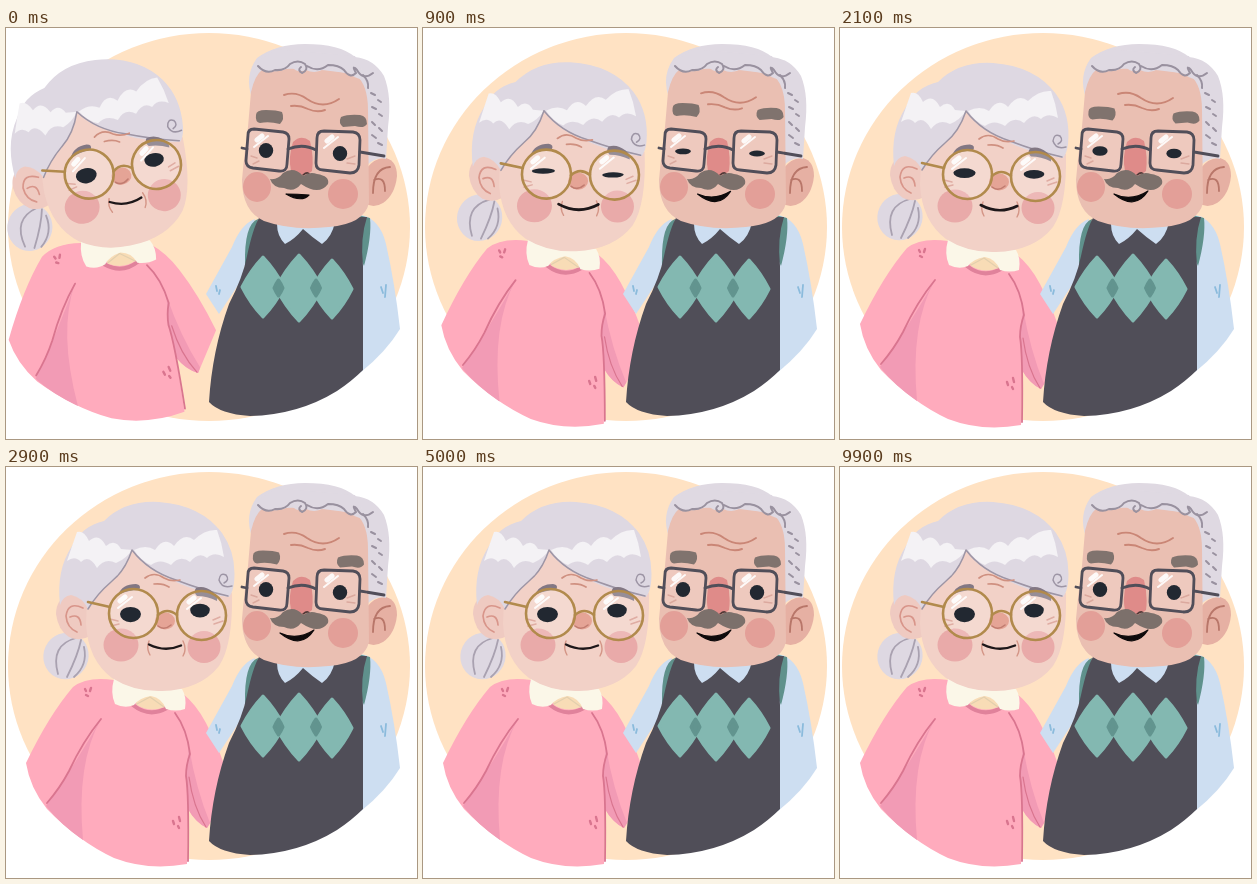
These frames come from a looping animation (411 by 411 pixels, 10 s). An HTML page:

```html
<!DOCTYPE html>
<html lang="en">
<head>
<meta charset="utf-8">
<title>Grandparents</title>
<style>
  html, body { margin: 0; width: 100%; height: 100%; overflow: hidden; background: #fff; }
  svg { display: block; width: 100vw; height: 100vh; }
  .line { fill: none; stroke-linecap: round; stroke-linejoin: round; }
</style>
</head>
<body>
<svg viewBox="0 0 411 411" xmlns="http://www.w3.org/2000/svg">
  <ellipse cx="203" cy="199" rx="201" ry="194" fill="#ffe2c3"/>

  <g id="woman">
    <!-- bun -->
    <ellipse cx="60" cy="189" rx="22.5" ry="23.5" fill="#ded8e2" transform="rotate(25 60 189)"/>
    <g class="line" stroke="#a9a1b0" stroke-width="1.8">
      <path d="M70 171Q44 178 52 207M75 173Q72 188 61 210M78 180Q82 198 68 210"/>
    </g>
    <!-- body -->
    <path fill="#ffabbd" d="M108 213Q81 209 67 220Q43 248 20 296Q24 321 41 342Q72 374 108 391Q142 404 181 397L182 342Q190 356 201 361L226 322Q215 284 200 256Q190 237 176 226Z"/>
    <path fill="#f29bb5" d="M95 252Q70 296 77 373Q54 357 40 339Q70 296 95 252Z"/>
    <path fill="#f29bb5" d="M183 280Q190 322 204 356L201 361Q189 355 182 342L180 306Z"/>
    <g class="line" stroke="#d9758f" stroke-width="1.8">
      <path d="M95 252Q77 274 63 304Q54 321 41 336"/>
      <path d="M169 246Q181 262 184 287Q180 298 180 309Q183 326 182 394"/>
      <path d="M183 310Q187 340 200 360" stroke-width="1.2"/>
      <path d="M79 222l1 2M85 221l-1 3M80 228l2 1M167 354l1 3M173 350l1 4M172 359l1 2" stroke-width="2.4"/>
    </g>
    <path class="line" d="M127 238Q143 251 161 241" stroke="#e0829b" stroke-width="4"/>
    <path fill="#f8dcb6" d="M125 222L168 225L158 240Q144 246 131 238Z"/>
    <path fill="#fbf7e8" d="M108 212Q104 226 109 237Q119 242 128 238Q133 231 145 229Q156 231 160 242Q170 245 179 242Q181 230 176 222Z"/>
    <path class="line" d="M131 237L144 230L158 240" stroke="#e2cfae" stroke-width="1.2"/>
    <!-- head -->
    <path fill="#efcac1" d="M82 139Q75 126 63 128Q50 132 50 147Q52 163 63 170Q74 175 84 169Z"/>
    <path class="line" d="M77 141Q62 134 60 149Q61 161 71 165M64 150Q74 146 75 158" stroke="#d8958a" stroke-width="1.7"/>
    <path fill="#f2d1c7" d="M126 78Q79 104 80 157Q82 193 106 211Q128 225 156 224Q194 223 213 199Q227 178 226 126Z"/>
    <path fill="#ded8e2" d="M54 138Q50 103 66 79Q76 59 98 54Q119 33 153 35Q195 38 216 66Q231 87 228 116Q227 125 223 130Q184 125 149 104Q136 97 126 84Q119 104 105 115Q91 127 82 142Q76 130 65 128Q57 129 54 138Z"/>
    <path fill="#f4f2f5" d="M61 94Q66 79 71 65Q78 63 83 74Q93 65 100 79Q109 71 115 82L126 83Q120 92 110 96Q99 90 91 101Q83 87 75 95Q69 88 61 94Z"/>
    <path fill="#f4f2f5" d="M128 83Q140 77 149 83Q158 69 168 79Q178 65 188 73Q199 62 211 63Q216 76 218 90Q208 84 201 91Q193 84 184 95Q174 87 165 98Q154 91 145 98Q135 94 128 83Z"/>
    <g class="line" stroke="#9d95a5" stroke-width="1.5">
      <path d="M126 83Q119 104 105 115Q91 127 82 142M126 83Q142 104 170 113Q196 123 222 129"/>
      <path d="M226 119Q216 122 213 113Q214 105 220 108Q224 113 218 116"/>
    </g>
    <path class="line" d="M139 111Q148 104 158 111Q165 115 174 113M148 117Q157 116 163 120" stroke="#cf9080" stroke-width="1.7"/>
    <!-- face -->
    <ellipse cx="115" cy="178" rx="17.5" ry="16.5" fill="#e9aaa9"/>
    <ellipse cx="198" cy="180" rx="16.5" ry="16" fill="#e9aaa9"/>
    <ellipse cx="159" cy="154" rx="10" ry="8.5" fill="#e5a496"/>
    <path class="line" d="M152 159Q158 164 165 158" stroke="#c17c70" stroke-width="1.6"/>
    <path class="line" d="M143 174Q140 181 144 188M177 174Q181 182 177 189" stroke="#d49687" stroke-width="1.4"/>
    <path class="line" d="M104 152l8 2M105 159l8 -2M208 157l9 -3M207 153l7 -3" stroke="#d99d91" stroke-width="1.5"/>
    <path id="wMouth" class="line" stroke="#1d1719"/>
    <g id="wBrows" fill="#827783">
      <path d="M112 128Q116 117 130 117Q136 118 133 123Q122 123 112 128Z"/>
      <path d="M190 121Q198 118 207 125Q212 130 211 134Q201 129 191 129Q187 125 190 121Z"/>
    </g>
    <circle cx="127.5" cy="146.5" r="24.5" fill="#fff" opacity=".16"/>
    <circle cx="195.5" cy="148.5" r="24.5" fill="#fff" opacity=".16"/>
    <g class="line" stroke="#fff" stroke-width="5" opacity=".9">
      <path d="M114 134l5 -4M183 135l5 -4"/>
      <path d="M112 141l14 -11M181 142l14 -11" stroke-width="2"/>
    </g>
    <g id="wEyes"></g>
    <g class="line" stroke="#b18a4c" stroke-width="2.6">
      <circle cx="127.5" cy="146.5" r="24.5"/>
      <circle cx="195.5" cy="148.5" r="24.5"/>
      <path d="M82 135L104 140M152 148Q161 140 171 148"/>
    </g>
  </g>

  <g id="man">
    <!-- shirt and vest -->
    <path fill="#cddef1" d="M249 191Q235 196 226 219L200 266L213 286L236 251Z"/>
    <path fill="#cddef1" d="M355 187Q374 191 380 216Q389 256 394 301Q380 324 355 344Z"/>
    <path fill="#5f918c" d="M252 191Q238 196 239 237L248 224ZM352 187L364 190Q366 208 358 238L350 220Z"/>
    <path fill="#504e58" d="M253 190Q247 200 241 228Q237 249 223 276Q206 323 203 374Q214 386 244 388Q292 387 331 363Q346 353 357 342L357 238Q354 210 361 189Z"/>
    <path fill="#cddef1" d="M271 196Q271 208 279 216Q289 211 297 201Q307 210 316 216Q326 209 329 194Z"/>
    <path class="line" d="M210 258l1 5M214 262l-1 4M375 259l2 6M380 257l-1 12" stroke="#8bbbdc" stroke-width="1.8"/>
    <g id="argyle"></g>
    <!-- head -->
    <path fill="#e6b0a3" d="M360 141Q369 129 380 130Q391 133 391 148Q389 167 377 175Q367 181 359 175Z"/>
    <path class="line" d="M384 139Q367 140 367 165M368 152Q379 147 379 163" stroke="#b87669" stroke-width="1.8"/>
    <path fill="#dfd9e2" d="M246 70Q238 48 251 30Q270 16 299 16Q334 16 349 29Q368 31 378 48Q386 68 382 99L380 131Q371 128 361 137Z"/>
    <path fill="#eabfb2" d="M245 64Q249 47 256 42Q305 38 350 47Q362 57 362 82L363 175Q358 196 323 199Q286 203 258 193Q236 183 236 152Q239 119 242 99Z"/>
    <path fill="#dfd9e2" d="M250 34Q257 47 267 43Q278 44 285 38Q291 46 300 42Q311 47 320 39Q331 44 338 41Q346 50 361 53L349 28L270 21Z"/>
    <g class="line" stroke="#99919f" stroke-width="2">
      <path d="M252 38Q260 47 269 42Q279 43 284 36Q292 31 299 36Q303 42 296 45Q291 42 295 39M301 38Q312 45 322 37Q333 37 338 42Q344 51 350 45Q345 36 351 42Q357 53 367 45"/>
      <path d="M357 47Q363 53 362 60"/>
      <path d="M365 65l4 2M372 72l3 2M366 79l4 2M373 86l3 2M366 94l3 3M373 100l3 3M366 107l4 3M372 115l4 2"/>
    </g>
    <path id="mWrinkles" class="line" d="M278 67Q290 63 301 71Q317 82 333 71M285 78Q294 77 302 81Q311 85 319 82" stroke="#ca8676" stroke-width="1.9"/>
    <ellipse cx="251" cy="159" rx="14" ry="15" fill="#e39f98"/>
    <circle cx="337" cy="166" r="15" fill="#e39f98"/>
    <path id="mMouth" fill="#0e0a0b" stroke="#0e0a0b" stroke-width="1.2" stroke-linejoin="round"/>
    <path fill="#df8b89" d="M287 114Q295 106 304 113Q308 129 306 143Q296 152 285 143Q282 129 287 114Z"/>
    <path class="line" d="M297 147Q303 142 304 149" stroke="#4e3836" stroke-width="1.6"/>
    <path fill="#7c706b" d="M264 151Q272 152 277 145Q288 138 297 148Q304 143 311 146Q324 148 322 156Q313 168 295 156Q288 165 278 160Q267 160 264 151Z"/>
    <path class="line" d="M245 128l6 2M247 136l6 -3M341 131l8 -3M341 135l8 1" stroke="#d4988b" stroke-width="1.4"/>
    <g id="mBrows" fill="#80736e">
      <path d="M250 87Q250 82 260 82Q271 82 276 84Q279 91 274 96Q263 93 254 95Q249 94 250 87Z"/>
      <path d="M335 89Q342 86 354 87Q361 88 361 96Q358 101 349 98L337 99Q332 95 335 89Z"/>
    </g>
    <path fill="#fff" fill-opacity=".16" stroke="#514e59" stroke-width="2.8" d="M248 101L277 104Q283 105 283 111L281 136Q281 144 273 143L247 140Q240 139 240 133L242 107Q242 101 248 101ZM318 103L347 104Q354 105 354 112L353 137Q352 145 344 145L317 142Q310 142 310 135L311 110Q311 103 318 103Z"/>
    <g class="line" stroke="#fff" stroke-width="5" opacity=".9">
      <path d="M251 112l5 -4M321 113l5 -4"/>
      <path d="M248 119l14 -11M318 120l14 -11" stroke-width="2"/>
    </g>
    <g id="mEyes"></g>
    <path class="line" stroke="#514e59" stroke-width="2.8" d="M236 120L241 121M282 121Q297 115 310 122M354 124L378 128"/>
  </g>
</svg>

<script>
const LOOP = 10000;
const NS = "http://www.w3.org/2000/svg";
const $ = id => document.getElementById(id);
const mix = (a, b, k) => a + (b - a) * k;

// Sine ease from 0 to 1 between two times
function ramp(t, from, to) {
  const u = Math.min(1, Math.max(0, (t - from) / (to - from)));
  return (1 - Math.cos(Math.PI * u)) / 2;
}

function add(parent, tag, attrs) {
  const el = parent.appendChild(document.createElementNS(NS, tag));
  for (const k in attrs) el.setAttribute(k, attrs[k]);
  return el;
}

// Diamond with slightly bulging sides
function diamond(x, y, rx, ry, fill) {
  const bx = rx * 0.6, by = ry * 0.56;
  add($("argyle"), "path", {
    d: `M${x} ${y - ry}Q${x + bx} ${y - by} ${x + rx} ${y}Q${x + bx} ${y + by} ${x} ${y + ry}` +
       `Q${x - bx} ${y + by} ${x - rx} ${y}Q${x - bx} ${y - by} ${x} ${y - ry}Z`,
    fill, stroke: fill, "stroke-width": 3, "stroke-linejoin": "round"
  });
}
diamond(257, 259, 21, 30, "#83b8b1");
diamond(293, 260, 23, 33, "#83b8b1");
diamond(326, 261, 20, 29, "#83b8b1");
diamond(272.5, 260, 4.5, 8, "#62948f");
diamond(310, 260, 4.5, 8, "#62948f");

// x, y, radii, and how far the eye drifts while closing
const eyes = [
  { host: "wEyes", x: 124.5, y: 147, rx: 10.5, ry: 8.2, drift: -4.5 },
  { host: "wEyes", x: 194, y: 143, rx: 9.8, ry: 7.4, drift: 6 },
  { host: "mEyes", x: 260, y: 122.5, rx: 7.2, ry: 7.6, drift: 1 },
  { host: "mEyes", x: 334, y: 125.5, rx: 7.2, ry: 7.6, drift: 0 }
];
for (const e of eyes) e.el = add($(e.host), "path", { fill: "#222831" });

// Eye with a flatter upper lid
function drawEye(e, shut) {
  const rx = e.rx * (1 + 0.12 * shut), ry = mix(e.ry, 2.1, shut);
  const lid = ry * (e.host === "wEyes" ? 0.85 : 1);
  const y = e.y + e.drift * shut;
  e.el.setAttribute("d",
    `M${e.x - rx} ${y}A${rx} ${lid} 0 0 1 ${e.x + rx} ${y}A${rx} ${ry} 0 0 1 ${e.x - rx} ${y}Z`);
}

function render(t) {
  const lean = ramp(t, 0, 1120);
  const shut = ramp(t, 0, 1200) * (1 - ramp(t, 1700, 2500));

  $("woman").setAttribute("transform", `rotate(${-9.8 * (1 - lean)} 103 405)`);
  for (const e of eyes) drawEye(e, shut);

  const w = mix(16, 20.5, shut), y = 177.5 - shut;
  $("wMouth").setAttribute("d", `M${159 - w} ${y}Q159 ${y + mix(8, 12, shut)} ${159 + w} ${y + 1}`);
  $("wMouth").setAttribute("stroke-width", mix(2.3, 2.9, shut));
  $("wBrows").setAttribute("transform", `translate(0 ${-shut})`);

  const l = mix(280, 274, lean), r = mix(303, 308, lean);
  const mid = (l + r) / 2, deep = mix(175, 183, lean);
  $("mMouth").setAttribute("d",
    `M${l} 166Q${mid} ${deep - 9} ${r} ${mix(167, 163, lean)}Q${mid + 4} ${deep} ${l} 166Z`);
  const open = lean * (1 - shut);
  $("mBrows").setAttribute("transform", `translate(${-3 * open} ${mix(0, 1.5, open) - 8.5 * shut})`);
  $("mWrinkles").setAttribute("transform", `translate(0 ${-2 * shut})`);
}

const start = performance.now();
function tick() {
  render((performance.now() - start) % LOOP);
  requestAnimationFrame(tick);
}
render(0);
requestAnimationFrame(tick);
</script>
</body>
</html>
```
